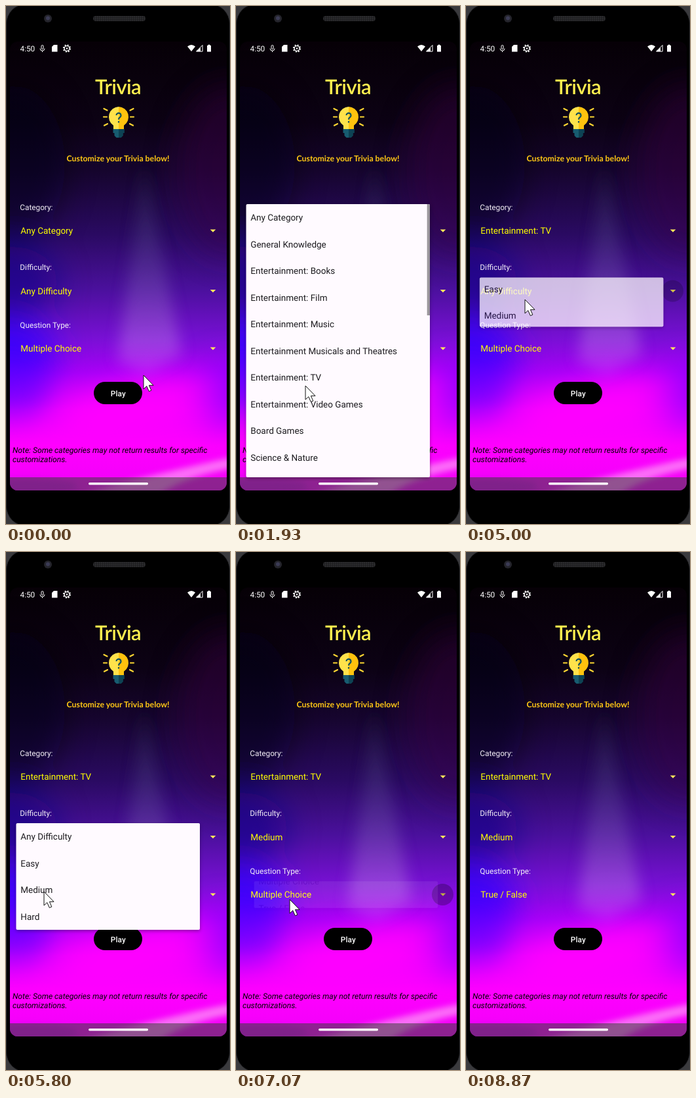
Animation of 342x787 px, one loop 9870 ms. Source, as an HTML page:

```html
<!DOCTYPE html>
<html lang="en">
<head>
<meta charset="utf-8">
<title>Trivia setup</title>
<style>
  html, body { margin: 0; width: 100%; height: 100%; overflow: hidden; background: #000; }
  svg { display: block; width: 342px; height: 787px; font-family: Roboto, sans-serif; text-rendering: geometricPrecision; }
  .label { font-size: 11.8px; fill: #f4f0f8; }
  .value { font-size: 13.47px; fill: #ff0; }
  .item { font-size: 13.47px; fill: #1c1b1f; }
  .note { font-size: 12.1px; font-style: italic; fill: #000; }
  .lettering { font-family: Lato, sans-serif; text-anchor: middle; }
</style>
</head>
<body>
<svg viewBox="0 0 342 787">
  <defs>
    <linearGradient id="sky" x2="0" y2="1">
      <stop offset="0" stop-color="#060006"/>
      <stop offset=".18" stop-color="#0c0214"/>
      <stop offset=".29" stop-color="#16052e"/>
      <stop offset=".43" stop-color="#2a0a62"/>
      <stop offset=".55" stop-color="#4a109c"/>
      <stop offset=".66" stop-color="#7810d4"/>
      <stop offset=".74" stop-color="#a800f8"/>
      <stop offset=".82" stop-color="#ee00ff"/>
      <stop offset=".9" stop-color="#f0f"/>
      <stop offset="1" stop-color="#f000f8"/>
    </linearGradient>
    <linearGradient id="beam" x2="0" y2="1">
      <stop offset="0" stop-color="#3a5060" stop-opacity=".2"/>
      <stop offset=".45" stop-color="#7060a8" stop-opacity=".28"/>
      <stop offset=".85" stop-color="#c080e8" stop-opacity=".42"/>
      <stop offset="1" stop-color="#e060ff" stop-opacity=".3"/>
    </linearGradient>
    <filter id="soft" x="-100%" y="-100%" width="300%" height="300%"><feGaussianBlur stdDeviation="24"/></filter>
    <filter id="glow" x="-100%" y="-50%" width="300%" height="200%"><feGaussianBlur stdDeviation="11"/></filter>
    <filter id="streak" x="-50%" y="-100%" width="200%" height="300%"><feGaussianBlur stdDeviation="5"/></filter>
    <filter id="shadow" x="-10%" y="-10%" width="120%" height="125%">
      <feDropShadow dx="0" dy="2" stdDeviation="2.5" flood-opacity=".35"/>
    </filter>
    <pattern id="mesh" width="3" height="3" patternUnits="userSpaceOnUse">
      <rect width="3" height="3" fill="#1a1a1c"/><circle cx="1.5" cy="1.5" r="1" fill="#39393c"/>
    </pattern>
    <clipPath id="screen"><rect x="6" y="54" width="331" height="682" rx="12"/></clipPath>
    <clipPath id="reveal"><rect id="revealBox" width="280.5" rx="2"/></clipPath>
  </defs>

  <!-- phone body -->
  <rect width="342" height="787" fill="#3a3a3d"/>
  <rect x=".5" y="-3" width="341" height="793" rx="30" stroke="#29292c"/>
  <circle cx="64" cy="19" r="6" fill="#24242b"/>
  <circle cx="64" cy="18.5" r="3" fill="#3b3b55"/>
  <rect x="133" y="15" width="80" height="8" rx="4" fill="url(#mesh)"/>

  <!-- wallpaper -->
  <g clip-path="url(#screen)">
    <rect x="6" y="54" width="331" height="682" fill="url(#sky)"/>
    <g filter="url(#soft)">
      <ellipse cx="10" cy="240" rx="80" ry="120" fill="#040018" opacity=".5"/>
      <ellipse cx="340" cy="250" rx="80" ry="130" fill="#3a0448" opacity=".45"/>
      <ellipse cx="5" cy="420" rx="75" ry="55" fill="#12008a" opacity=".65"/>
      <ellipse cx="0" cy="525" rx="80" ry="50" fill="#3400ff" opacity=".85"/>
      <ellipse cx="0" cy="590" rx="75" ry="32" fill="#7000ff" opacity=".85"/>
      <ellipse cx="345" cy="590" rx="60" ry="50" fill="#9000ff" opacity=".75"/>
      <ellipse cx="195" cy="612" rx="120" ry="36" fill="#f0f" transform="rotate(-14 195 612)"/>
    </g>
    <path d="M211 235L170 540L215 560L268 530Z" fill="url(#beam)" filter="url(#glow)"/>
    <g filter="url(#streak)">
      <ellipse cx="30" cy="730" rx="80" ry="12" fill="#b000d8" opacity=".5"/>
      <path d="M115 742Q220 712 345 686V702Q270 716 235 742Z" fill="#ffc8f4" opacity=".55"/>
    </g>
    <rect x="6" y="716" width="331" height="20" fill="#3c3c3c" opacity=".55"/>
  </g>
  <rect x="126" y="724" width="91" height="3.4" rx="1.7" fill="#fff"/>

  <!-- status bar -->
  <g fill="#fff">
    <text x="21.5" y="69" font-size="11.8">4:50</text>
    <rect x="54" y="59.5" width="3" height="6" rx="1.5" fill="none" stroke="#fff"/>
    <path d="M52 64.5a3.5 3.5 0 0 0 7 0M55.5 68v2" fill="none" stroke="#fff"/>
    <path d="M73 59h5.5v10.5h-8.5v-7.5z"/>
    <circle cx="93" cy="64.5" r="3.8" fill="none" stroke="#fff" stroke-width="1.3"/>
    <circle cx="93" cy="64.5" r="5.2" fill="none" stroke="#fff" stroke-width="1.8" stroke-dasharray="2 2.084"/>
    <circle cx="93" cy="64.5" r="1.3"/>
    <path d="M277 61.5q6-5 12 0l-6 7.5z"/>
    <path d="M300 59.5v9.5h-9.5z" fill="none" stroke="#fff"/>
    <path d="M297 63v6h-6.5z"/>
    <path d="M307 60h1.5v-1.3h3v1.3h1.5v9.5h-6z"/>
  </g>

  <!-- heading -->
  <text class="lettering" x="171" y="134" font-size="31" font-weight="600" letter-spacing="-.6" fill="#fff04f">Trivia</text>
  <path d="M172 153a15.5 15.5 0 0 0-8 28.5v5.5h8z" fill="#ffe24b"/>
  <path d="M172 153a15.5 15.5 0 0 1 8 28.5v5.5h-8z" fill="#ffc20e"/>
  <path d="M163.500 187h17v6h-2v4l-3 3h-7l-3-3v-4h-2z" fill="#175c70"/>
  <path d="M172 187h8.5v6h-2v4l-3 3H172z" fill="#0d4253"/>
  <path d="M168.500 166a3.500 3.500 0 1 1 5.500 3q-2 1-2 3.500m0 2.500v2.200" fill="none" stroke="#0d4f60" stroke-width="2.200"/>
  <path d="M149.500 156l5 2.500m-5.500 10h5m-4 13l5-2.500M194.500 156l-5 2.500m5.500 10h-5m4 13l-5-2.500" stroke="#ffd633" stroke-width="2.200" stroke-linecap="round"/>
  <text class="lettering" x="171" y="236" font-size="12.3" font-weight="700" fill="#ffc815">Customize your Trivia below!</text>

  <!-- form -->
  <g id="form"></g>
  <rect x="134" y="571" width="74" height="34" rx="17"/>
  <text x="171.300" y="592.500" font-size="11.8" font-weight="500" fill="#fff" text-anchor="middle" letter-spacing=".1">Play</text>
  <text class="note" x="10" y="678.500">Note: Some categories may not return results for specific</text>
  <text class="note" x="10" y="692.700">customizations.</text>

  <circle id="arrowRipple" cx="315.5" r="16.5"/>
  <g id="popup" filter="url(#shadow)">
    <g clip-path="url(#reveal)">
      <rect x="-20" width="400" height="787" fill="#fffaff"/>
      <g id="items"></g>
      <circle id="itemRipple" r="11" fill="#402060" opacity=".08"/>
      <rect id="scrollbar" x="291.700" y="301" width="4.300" height="169" fill="#9b979c"/>
    </g>
  </g>
  <path id="cursor" d="M0 0V21L4.800 16.600L8.300 24.500L11.800 23L8.400 15.300H15Z" fill="#fff" stroke="#111" stroke-linejoin="round"/>
</svg>
<script>
const LOOP = 9870, STEP = 1000 / 15, ROW = 40.5, LEFT = 15.5, OPENING = 250;

// Each spinner is tapped, opens, has an item pressed, and closes with a new value.
const spinners = [
  { label: 'Category:', y: 341.5, top: 301, bottom: 716, tap: 1066, open: 1100, press: 3733, pick: 6,
    options: ['Any Category', 'General Knowledge', 'Entertainment: Books', 'Entertainment: Film',
      'Entertainment: Music', 'Entertainment Musicals and Theatres', 'Entertainment: TV',
      'Entertainment: Video Games', 'Board Games', 'Science & Nature'] },
  { label: 'Difficulty:', y: 433, top: 412, bottom: 574, tap: 4866, open: 4933, press: 6133, pick: 2,
    options: ['Any Difficulty', 'Easy', 'Medium', 'Hard'] },
  { label: 'Question Type:', y: 520.5, top: 500, bottom: 581, tap: 7066, open: 7060, press: 8000, pick: 1,
    options: ['Multiple Choice', 'True / False'] }
];

// Cursor stops: time, x, y
const stops = [
  [0, 210, 561], [600, 72, 353], [1320, 72, 353], [1933, 106, 577],
  [3060, 106, 577], [3066, 106, 574], [3130, 106, 574], [3133, 106, 577],
  [4066, 106, 577], [4400, 79, 437], [4533, 90, 446], [5130, 90, 446], [5800, 58, 516],
  [6133, 58, 516], [6533, 82, 528], [7260, 82, 528], [7733, 75, 557],
  [8040, 75, 557], [8830, 323, 730]
];
const CURSOR_GONE = 8866;

const $ = id => document.getElementById(id);
const clamp = v => Math.max(0, Math.min(1, v));
const lerp = (a, b, u) => a + (b - a) * u;
const smooth = u => u * u * (3 - 2 * u);
const set = (el, attrs) => { for (const k in attrs) el.setAttribute(k, attrs[k]); };

// Cubic-bezier(x1, 0 or linear start, .2, 1): find the parameter by bisection.
function bezier(x1, y1, x2, y2) {
  const axis = (a, b, s) => 3 * (1 - s) * (1 - s) * s * a + 3 * (1 - s) * s * s * b + s * s * s;
  return u => {
    let low = 0, high = 1;
    for (let i = 0; i < 20; i++) {
      const mid = (low + high) / 2;
      if (axis(x1, x2, mid) < u) low = mid; else high = mid;
    }
    return axis(y1, y2, low);
  };
}
const fastOutSlowIn = bezier(.4, 0, .2, 1);
const linearOutSlowIn = bezier(0, 0, .2, 1);

function add(parent, tag, attrs, text = '') {
  const el = document.createElementNS('http://www.w3.org/2000/svg', tag);
  set(el, attrs);
  el.textContent = text;
  return parent.appendChild(el);
}

for (const s of spinners) {
  add($('form'), 'text', { class: 'label', x: 21.3, y: s.y - 31.8 }, s.label);
  s.value = add($('form'), 'text', { class: 'value', x: 22.3, y: s.y + 4.9 });
  add($('form'), 'path', { d: `M311.7 ${s.y - 2}h8.6l-4.3 4.3z`, fill: '#ffe95a' });
  s.list = add($('items'), 'g', {});
  s.options.forEach((name, i) =>
    add(s.list, 'text', { class: 'item', x: 22.3, y: s.top + ROW * (i + .5) + 4.9 }, name));
}

function cursorAt(t) {
  const i = stops.findIndex(s => s[0] > t);
  if (i < 0) return stops[stops.length - 1].slice(1);
  const [t0, x0, y0] = stops[i - 1], [t1, x1, y1] = stops[i];
  const u = smooth((t - t0) / (t1 - t0));
  return [lerp(x0, x1, u), lerp(y0, y1, u)];
}

function scrollbarOpacity(t) {
  return t >= 3260 ? 1 : 1 - clamp((t - 2470) / 330);
}

function drawPopup(s, t, x, y) {
  // The sheet slides away from its spinner while the clip grows to full height.
  const age = t - s.open, u = clamp(age / OPENING);
  const grow = fastOutSlowIn(u);
  const dx = 13.5 * (1 - linearOutSlowIn(u));
  const dy = (s.y - (s.top + s.bottom) / 2) * (1 - grow);
  const top = lerp(s.y - ROW / 2, s.top, grow);
  const bottom = lerp(s.y + ROW / 2, s.bottom, grow);
  const transform = `translate(${dx} ${dy})`;
  set($('revealBox'), { x: LEFT + dx, y: top, height: bottom - top });
  set($('popup'), { opacity: clamp(age / 90) });
  set($('items'), { transform });
  set($('scrollbar'), { transform, opacity: s === spinners[0] ? scrollbarOpacity(t) : 0 });
  set($('itemRipple'), { cx: x, cy: y, visibility: t >= s.press - 1 ? 'inherit' : 'hidden' });
}

function draw(t) {
  const [x, y] = cursorAt(t);
  let active = null, ripple = 0;
  for (const s of spinners) {
    const closeAt = s.press + 60;
    const isOpen = t >= s.tap && t < closeAt;
    s.value.textContent = s.options[t >= closeAt ? s.pick : 0];
    set(s.list, { visibility: isOpen ? 'inherit' : 'hidden' });
    if (!isOpen) continue;
    active = s;
    ripple = .25 * (1 - clamp((t - s.tap - 60) / 300));
    set($('arrowRipple'), { cy: s.y });
  }
  set($('arrowRipple'), { opacity: ripple });
  set($('popup'), { visibility: active ? 'visible' : 'hidden' });
  if (active) drawPopup(active, t, x, y);
  set($('cursor'), {
    transform: `translate(${x} ${y})`,
    visibility: t < CURSOR_GONE ? 'visible' : 'hidden'
  });
}

const start = performance.now();
function tick() {
  const t = (performance.now() - start) % LOOP;
  draw(Math.floor((t + 4) / STEP) * STEP);
  requestAnimationFrame(tick);
}
tick();
</script>
</body>
</html>
```
